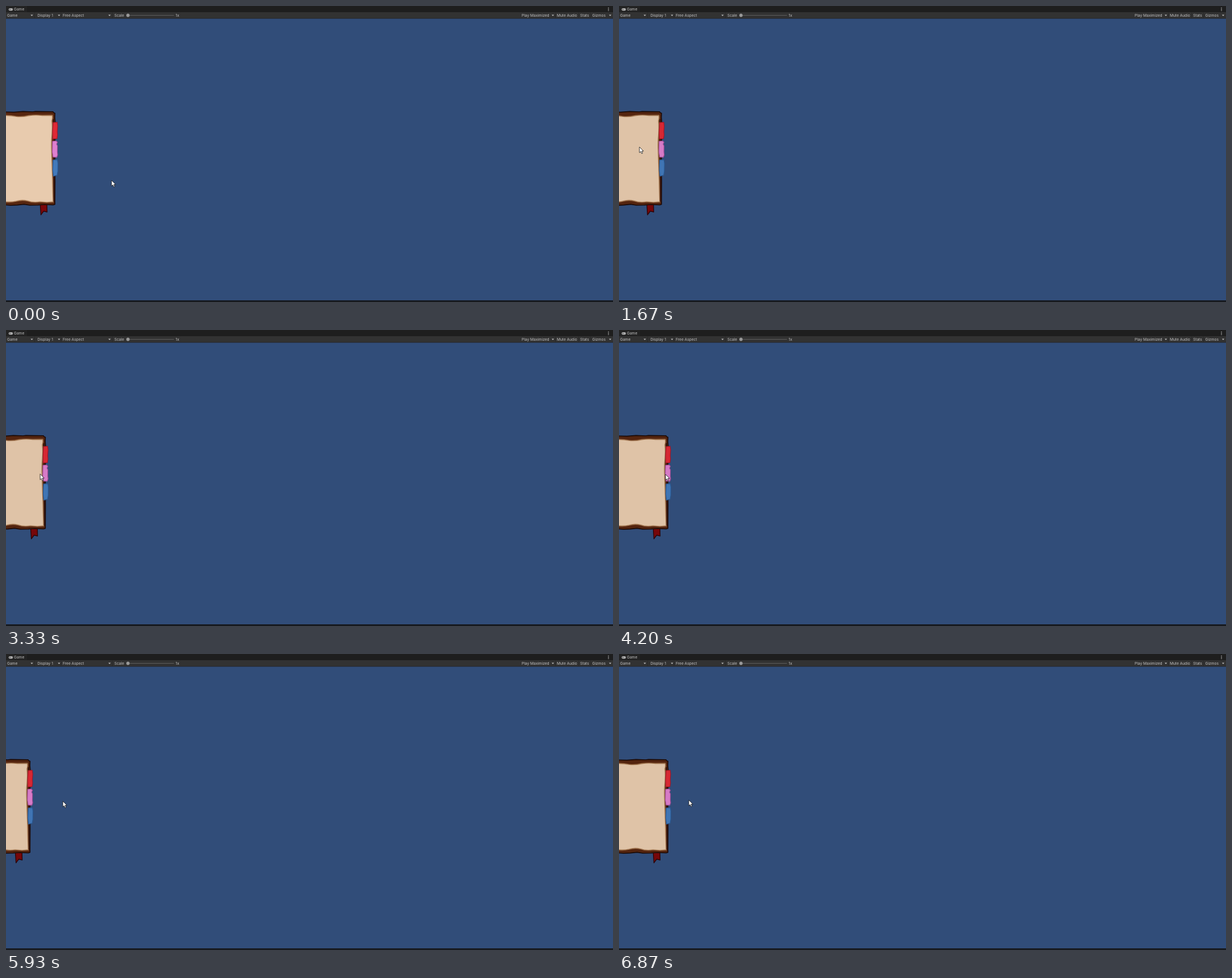
These frames come from a looping animation (1070 by 523 pixels, 7.59 s). An HTML page:

```html
<!DOCTYPE html>
<html lang="en">
<head>
<meta charset="utf-8">
<title>Book panel</title>
<style>
  html, body { margin: 0; width: 100%; height: 100%; overflow: hidden; background: #314d79; }
  svg { display: block; }
  text { font: 6.6px Inter, Roboto, sans-serif; fill: #c4c4c4; }
</style>
</head>
<body>
<svg width="1070" height="523" viewBox="0 0 1070 523">
  <defs>
    <radialGradient id="shade"><stop offset="0" stop-color="#8a6245" stop-opacity=".75"/><stop offset=".5" stop-color="#9a7250" stop-opacity=".33"/><stop offset="1" stop-color="#9a7250" stop-opacity="0"/></radialGradient>
    <radialGradient id="stain"><stop offset="0" stop-color="#c98f60" stop-opacity=".65"/><stop offset=".6" stop-color="#c98f60" stop-opacity=".35"/><stop offset="1" stop-color="#c98f60" stop-opacity="0"/></radialGradient>
    <radialGradient id="glow"><stop offset="0" stop-color="#f4dcc4" stop-opacity=".55"/><stop offset="1" stop-color="#f4dcc4" stop-opacity="0"/></radialGradient>
    <clipPath id="pageClip"><use href="#page"/></clipPath>
  </defs>

  <rect width="1070" height="523" fill="#314d79"/>

  <g id="book">
    <path d="M60 346L72 346L72.5 364L66.5 362.5L61.5 369Z" fill="#7b070a" stroke="#2c0508" stroke-width="1.3" stroke-linejoin="round"/>
    <path d="M-4 187.2L14 187.6L30 186.4L47 187L52 186.4L83 186.8L84 188.6L86.3 189.5L86 197L86.6 204L86 260L86.4 310L86.2 350.5L83 351.5L68 350.8L56 351.8L42 352L32 350.4L20 351.6L8 352.3L-4 351Z" fill="#57260f" stroke="#1c0a07" stroke-width="1.6" stroke-linejoin="round"/>
    <path id="page" d="M-4 193.5Q8 193 17 195Q28 196.5 40 193.6Q52 192 64 193.4L81.5 193.2Q82.8 197 81 203Q82.2 214 81.2 226Q79.8 240 80.5 256Q81.3 285 82.2 308Q82.6 330 83.2 346.2L72 347L60 346Q48 348 38 344.5Q28 342 18 345Q8 347.5 -4 345.5Z" fill="#e8cbae"/>
    <g clip-path="url(#pageClip)">
      <ellipse cx="22" cy="250" rx="42" ry="65" fill="url(#glow)"/>
      <ellipse cx="81" cy="204" rx="38" ry="30" fill="url(#shade)"/>
      <ellipse cx="84" cy="244" rx="29" ry="46" fill="url(#shade)" opacity=".7"/>
      <ellipse cx="83" cy="300" rx="15" ry="65" fill="url(#shade)" opacity=".4"/>
      <ellipse cx="62" cy="334" rx="43" ry="31" fill="url(#stain)"/>
      <ellipse cx="1" cy="200" rx="16" ry="11" fill="url(#stain)"/>
      <g id="spots" fill="#b9814f"/>
    </g>
    <use href="#page" style="fill:none"/>
    <path d="M-4 193.5Q8 193 17 195Q28 196.5 40 193.6Q52 192 64 193.4L81.5 193.2Q82.8 197 81 203Q82.2 214 81.2 226Q79.8 240 80.5 256Q81.3 285 82.2 308Q82.6 330 83.2 346.2L72 347L60 346Q48 348 38 344.5Q28 342 18 345Q8 347.5 -4 345.5" fill="none" stroke="#a4764f" stroke-width="1.7"/>
    <path d="M83.5 200V205M84.8 234V239M84.8 266V272M84.8 301V346" stroke="#35140c" stroke-width="2.2"/>
    <g stroke-width="1.2" stroke-linejoin="round">
      <path d="M83 206L90.2 205.4L91 212L90.3 222L90.8 228L89.8 234.4L82.4 234.8L82 222Z" fill="#df2a35" stroke="#a9182a"/>
      <path d="M82 239L88.5 238.4L90.6 241L89 244L90.6 247L90.4 258L91 263L89.5 267.2L83 267L81.6 258Z" fill="#df80cf" stroke="#a8519c"/>
      <path d="M83 272L90.5 271.6L91.4 278L91.2 292L90 299L83.5 300.7L82.4 290Z" fill="#437abb" stroke="#2b5c97"/>
    </g>
  </g>

  <rect width="1070" height="11" fill="#1e1e1e"/>
  <rect width="37" height="11" fill="#232323"/>
  <rect y="11" width="1070" height="11" fill="#323232"/>
  <rect y="21.6" width="1070" height=".8" fill="#222"/>
  <rect y="520" width="1070" height="3" fill="#171a20"/>
  <path d="M50.5 11.5V21.5M97 11.5V21.5M187.5 11.5V21.5M968.5 11.5V21.5M1009.5 11.5V21.5M1030.5 11.5V21.5" stroke="#292929"/>
  <rect x="4.7" y="3.9" width="7.4" height="4.4" rx="2.2" fill="#c4c4c4"/>
  <path d="M6 6.1h2M7 5.1v2M9.4 6.1h1.4" stroke="#232323" stroke-width=".8"/>
  <path d="M1062 2.8v1.3M1062 5.1v1.3M1062 7.4v1.3" stroke="#c4c4c4" stroke-width="1.3"/>
  <path d="M215 16.5H296" stroke="#5e5e5e"/>
  <circle cx="215" cy="16.5" r="2.9" fill="#999"/>
  <g id="labels"></g>

  <path id="cursor" d="M0 0V10.2L2.3 8L4 11.8L5.7 11L4.1 7.3H7.2Z" fill="#fff" stroke="#111" stroke-width=".8" stroke-linejoin="round"/>
</svg>
<script>
  const $ = id => document.getElementById(id);
  const LOOP = 7590, FPS = 15;

  const labels = [
    ['Game', 14, 8.4], ['Game', 2], ['Display 1', 55.5], ['Free Aspect', 100], ['Scale', 191], ['1x', 299],
    ['Play Maximized', 909], ['Mute Audio', 971], ['Stats', 1012], ['Gizmos', 1033.5]
  ];
  const carets = [45.5, 93.5, 182.5, 964, 1065];
  $('labels').innerHTML =
    labels.map(([s, x, y = 19]) => `<text x="${x}" y="${y}">${s}</text>`).join('') +
    carets.map(x => `<path d="M${x - 2.2} 15.4h4.4l-2.2 2.4z" fill="#c4c4c4"/>`).join('');

  // Mottling on the lower stain and the upper left corner
  let seed = 7;
  const rnd = () => (seed = seed * 16807 % 2147483647) / 2147483647;
  const spot = (x, y, w, h) =>
    `<circle cx="${x + rnd() * w}" cy="${y + rnd() * h}" r="${.7 + rnd() * 1.6}" opacity="${.08 + rnd() * .14}"/>`;
  $('spots').innerHTML = Array.from({ length: 46 }, (_, i) =>
    i < 36 ? spot(50, 316, 26, 24) : spot(0, 196, 9, 9)).join('');

  // Pointer stops: time, x, y
  const stops = [
    [0, 186, 308], [130, 176, 328], [270, 140, 348], [400, 70, 300], [470, 31, 217], [600, 36, 249],
    [1670, 36, 249], [2200, 32, 251], [2670, 30, 252], [3100, 45, 254], [3670, 82, 255],
    [4200, 82, 255], [4800, 107, 257], [5000, 108, 257], [5730, 100, 260], [5930, 100, 260], [6530, 123, 258]
  ];
  const clamp = u => Math.min(1, Math.max(0, u));
  const smooth = u => (u = clamp(u), u * u * (3 - 2 * u));

  function pointer(t) {
    const i = stops.findIndex(s => s[0] > t);
    if (i < 0) return stops.at(-1).slice(1);
    const [t0, x0, y0] = stops[i - 1], [t1, x1, y1] = stops[i];
    const u = (t - t0) / (t1 - t0);
    return [x0 + (x1 - x0) * u, y0 + (y1 - y0) * u];
  }

  // The book slides out and back after each press
  const SLIDE = 1225, DEPTH = 58;
  const slide = (t, start) => smooth((t - start) / SLIDE) - smooth((t - start - SLIDE) / SLIDE);

  function draw(now) {
    const t = Math.floor((now % LOOP + 5) * FPS / 1000) * 1000 / FPS;
    const x = -DEPTH * (slide(t, 1320) + slide(t, 4315));
    const tint = 1 - .04 * clamp((t - 1260) / 70);
    $('book').setAttribute('transform', `translate(${x.toFixed(2)})`);
    $('book').style.filter = `brightness(${tint})`;
    $('cursor').setAttribute('transform', `translate(${pointer(t)})`);
    requestAnimationFrame(draw);
  }
  draw(0);
</script>
</body>
</html>
```
